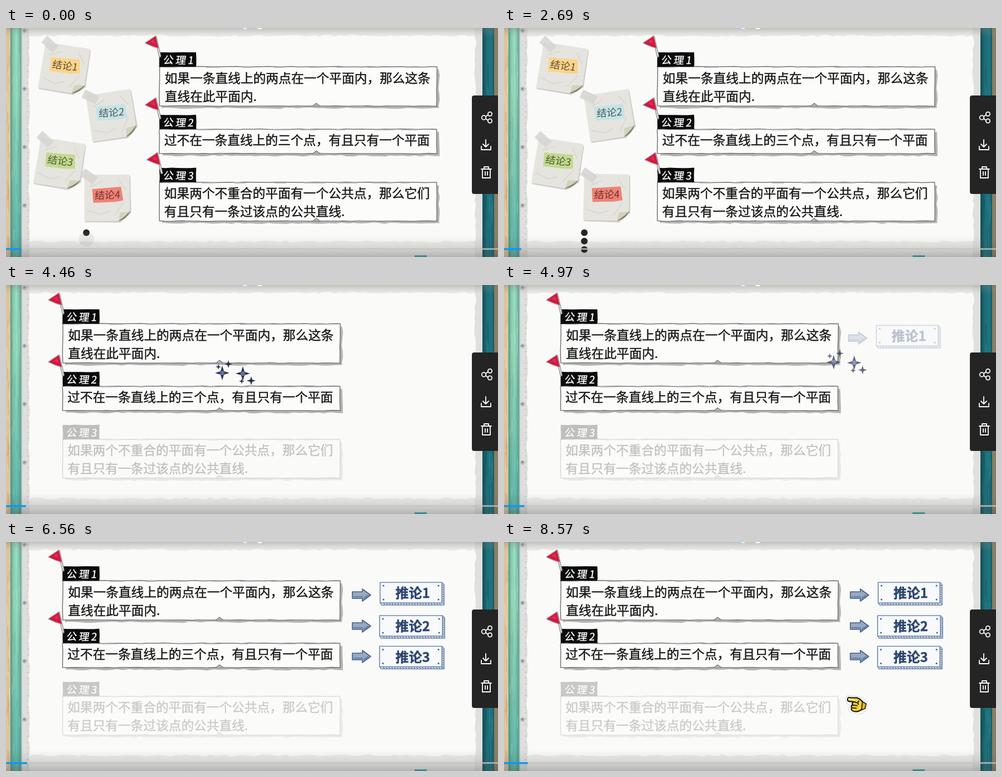
Write an HTML page that moves like this. It is 885x414 px and loops after 8670 ms.

```html
<!DOCTYPE html>
<html lang="zh">
<head>
<meta charset="utf-8">
<title>公理与推论</title>
<style>
html,body{margin:0;width:100%;height:100%;overflow:hidden;background:#fafaf9}
svg{display:block;width:100vw;height:100vh}
text{font-family:"Noto Sans CJK SC","Noto Sans CJK",sans-serif}
.body{font-size:22.75px;fill:#161616;stroke:#161616;stroke-width:.4}
.label{font-size:18.5px;fill:#fff;stroke:#fff;stroke-width:.4}
.memo{font-size:18px;fill:#4b443c;text-anchor:middle}
.sign{font-size:24px;font-weight:700;fill:#2b4570;stroke:#2b4570;stroke-width:.4;text-anchor:middle}
</style>
</head>
<body>
<svg id="stage" viewBox="0 0 885 414" preserveAspectRatio="none">
<defs>
  <linearGradient id="bar">
    <stop offset="0" stop-color="#4b9483"/><stop offset=".2" stop-color="#7cc8a8"/>
    <stop offset=".55" stop-color="#9cdcbd"/><stop offset=".85" stop-color="#6fbca2"/><stop offset="1" stop-color="#4f918a"/>
  </linearGradient>
  <linearGradient id="age" x2="0" y2="1">
    <stop offset=".3" stop-color="#2f8d92" stop-opacity="0"/><stop offset="1" stop-color="#2f8d92" stop-opacity=".5"/>
  </linearGradient>
  <linearGradient id="teal">
    <stop offset="0" stop-color="#0f4d58"/><stop offset=".35" stop-color="#1d6c78"/>
    <stop offset=".75" stop-color="#20757f"/><stop offset="1" stop-color="#174f58"/>
  </linearGradient>
  <linearGradient id="topShade" x2="0" y2="1">
    <stop offset="0" stop-color="#77776c" stop-opacity=".36"/><stop offset="1" stop-color="#999" stop-opacity="0"/>
  </linearGradient>
  <linearGradient id="lowShade" x2="0" y2="1">
    <stop offset="0" stop-color="#555" stop-opacity="0"/><stop offset=".5" stop-color="#555" stop-opacity=".12"/>
    <stop offset="1" stop-color="#444" stop-opacity=".34"/>
  </linearGradient>
  <radialGradient id="flash">
    <stop offset="0" stop-color="#fff" stop-opacity=".6"/><stop offset=".62" stop-color="#dfe6f2" stop-opacity=".25"/>
    <stop offset=".8" stop-color="#51648a" stop-opacity=".55"/><stop offset="1" stop-color="#8797b5" stop-opacity="0"/>
  </radialGradient>
</defs>
<g id="back"></g>
<g id="notes"></g>
<g id="dots"></g>
<g id="panels"></g>
<g id="signs"></g>
<g id="sparks"></g>
<g id="hand">
  <path d="M-20-10Q-18-17-10-15L3-16Q14-13 20-7L19 9Q12 17 2 16L-10 14Q-14 8-10 3Q-19-1-20-10Z" fill="#fff" stroke="#d2d2d0"/>
  <path d="M-16-9Q-16-13-11-12L1-13Q8-11 12-6L12 6Q6 13-2 12Q-9 11-7 6Q-9 3-6 0Q-8-3-5-5L-13-5Q-16-5-16-9Z" fill="#f2d23c" stroke="#17150f" stroke-width="2.2"/>
  <path d="M-15-9L-3-9" stroke="#fff6c4" stroke-width="2"/>
  <path d="M-5-5L4-4M-6 1L3 1M-6 6L2 6M5-8Q1-4 5-1" fill="none" stroke="#17150f" stroke-width="1.8"/>
  <path d="M11-7L18-4L17 5L11 8Z" fill="#e5b92c" stroke="#17150f" stroke-width="1.6"/>
</g>
<g id="chrome"></g>
</svg>
<script>
const LOOP = 8670, INK = '#2b3350';
const $ = id => document.getElementById(id);
let seed = 7;
const rnd = () => (seed = seed * 16807 % 2147483647) / 2147483647;
const tag = (n, a, s = '') =>
  `<${n} ${Object.entries(a).map(([k, v]) => `${k}="${v}"`).join(' ')}>${s}</${n}>`;
const rect = (x, y, width, height, fill, more = {}) => tag('rect', {x, y, width, height, fill, ...more});
const path = (d, fill, more = {}) => tag('path', {d, fill, ...more});
const text = (s, x, y, c, more = {}) => tag('text', {x, y, class: c, ...more}, s);
const group = (s, transform, more = {}) => tag('g', {transform, ...more}, s);
const circle = (cx, cy, r, fill, more = {}) => tag('circle', {cx, cy, r, fill, ...more});

// Torn outline of a box
function torn(x, y, w, h, j, step) {
  const p = [], add = (a, b) => p.push((a + (rnd() - .5) * j).toFixed(1) + ' ' + (b + (rnd() - .5) * j).toFixed(1));
  for (let i = 0; i < w; i += step) add(x + i, y);
  for (let i = 0; i < h; i += step) add(x + w, y + i);
  for (let i = w; i > 0; i -= step) add(x + i, y + h);
  for (let i = h; i > 0; i -= step) add(x, y + i);
  return 'M' + p.join('L') + 'Z';
}

function drawBack() {
  let s = rect(0, 0, 885, 414, '#ecece9') + rect(0, 0, 9, 414, '#dfc49b');
  for (let i = 0; i < 24; i++) s += rect(rnd() * 7, rnd() * 414, 2, 8 + rnd() * 26, i % 2 ? '#cda878' : '#ecd9b5', {opacity: .5});
  s += rect(8, 0, 20, 414, 'url(#bar)') + rect(8, 0, 20, 414, 'url(#age)');
  for (let i = 0; i < 20; i++) s += rect(10 + rnd() * 15, rnd() * 414, 1.5, 10 + rnd() * 40, i % 2 ? '#c2edd6' : '#4a9c8f', {opacity: .3});
  s += rect(28, 0, 14, 414, '#dededd') + rect(27, 0, 2, 414, '#b4bcb9');
  for (let y = 4; y < 414; y += 10.5) s += rect(37, y, 4, 1, '#bdbdbc');
  for (let i = 0; i < 4; i++) s += circle(33.5, 5 + i * 105.3, 4, '#bdbdbd') + circle(33, 4.5 + i * 105.3, 2, '#8d8d8d');
  s += rect(843, 0, 15, 414, '#e0e0dd') + rect(857, 0, 22, 414, 'url(#teal)') + rect(878, 0, 7, 414, '#8b7d64');
  for (let i = 0; i < 22; i++) s += rect(859 + rnd() * 16, rnd() * 414, 1.5, 12 + rnd() * 40, i % 2 ? '#3c949b' : '#0b3f4a', {opacity: .35});
  s += path(torn(42, 14, 802, 372, 4, 9), '#fafaf9');
  s += rect(0, 0, 885, 16, 'url(#topShade)') + rect(0, 376, 885, 38, 'url(#lowShade)');
  s += rect(735, 411, 22, 3, '#3c8c8d') + rect(415, 0, 9, 1.5, '#8fd0ff') + rect(427, 0, 6, 1.5, '#fff') + rect(453, 0, 7, 2, '#fff');
  $('back').innerHTML = s;
}

function memo(n, x, y, a, ink, color, ta) {
  const s = path('M-38-41L41-41L42 26L22 43L-41 42Z', '#cfcdc9', {transform: 'translate(1.5 2)'}) +
    path('M-40-42L41-42L41 25L21 42L-41 42Z', '#e6e4df') +
    path('M-30-20L-8-30M-36 22L-12 30L4 24M14 32L30 8M22-32L34-14', 'none', {stroke: '#dbd8d2', 'stroke-width': 2}) +
    path('M21 42L23 27L41 25Z', '#d3d2bc') + path('M21 42Q35 38 41 25Q35 33 21 42Z', '#76795a', {stroke: '#85886b'}) +
    group(rect(-14, -8, 28, 16, '#d6d5d3', {opacity: .85}), 'translate(-32 -39) rotate(34)') +
    group(path('M-27-12L25-14L28 11L12 13L-26 13Z', color) + text(n, 0, 6.5, 'memo', {style: 'fill:' + ink, transform: 'skewX(-5)'}), `translate(1 -5) rotate(${ta})`);
  return group(group(s, `rotate(${a})`), `translate(${x} ${y})`);
}

function drawNotes() {
  $('notes').innerHTML = memo('结论1', 104.5, 73, 9, '#5d4a2c', '#fad48c', -2) +
    memo('结论2', 189.5, 158, -9, '#4c5757', '#c5e3e4', 5) +
    memo('结论3', 96, 245, 9, '#4a5a2c', '#c3d990', -2) +
    group(memo('结论4', 184, 306, 1, '#6e302a', '#ee8376', -2), '', {id: 'last'});
  $('dots').innerHTML = [0, 1, 2].map(() => circle(144.5, 0, 6, '#262626')).join('');
}

const flag = (x, y) => group(
  path('M0 1L8 36', 'none', {stroke: '#8d8d8d', 'stroke-width': 4.4, 'stroke-linecap': 'round'}) +
  path('M0 1L8 36', 'none', {stroke: '#e4e4e2', 'stroke-width': 2}) +
  path('M0 0L-18 12Q-6 18 5 21Z', '#c9c5c6', {stroke: '#b3a9ab', 'stroke-width': 2.6, 'stroke-linejoin': 'round'}) +
  path('M0 0L-18 12Q-6 18 5 21Z', '#d3173f') + path('M-3 5L-10 10L0 14Z', '#e63a5a', {opacity: .6}),
  `translate(${x} ${y})`, {class: 'flag'});

function panel(n, y, h, fx, fy, lines, tx) {
  let s = path(torn(281, y + 5, 498, h - 1, 2.6, 11), '#b4b4b2');
  s += path(torn(276, y, 499, h, 1, 14), '#fcfcfb', {stroke: '#767674', 'stroke-width': 1.5});
  for (let i = 0; i < 7; i++) {
    const x = 345 + i * 60 + rnd() * 20, w = 12 + rnd() * 26;
    s += rect(x, y, w, 1.8, '#aaa') + rect(x - 30, y + h - 1, w, 2, '#999');
  }
  s += path(`M552 ${y + h}L558 ${y + h - 5}L565 ${y + h}`, '#b5b5b3', {stroke: '#777', 'stroke-width': 1.2});
  s += path(torn(276, y - 26, 66, 26, 1, 11), '#0b0b0b');
  s += group(text('公', 0, 0, 'label', {transform: 'rotate(-3)'}) + text('理', 22, -.5, 'label') + text(n, 44, -.5, 'label'), `translate(282.5 ${y - 5}) skewX(-8)`);
  lines.forEach((l, i) => s += text(l, tx, y + (h < 71 ? 28 : 29) + i * 32.5, 'body'));
  return tag('g', {class: 'panel'}, s + flag(fx, fy));
}

function drawPanels() {
  $('panels').innerHTML =
    panel(1, 70, 71, 269, 15, ['如果一条直线上的两点在一个平面内，那么这条', '直线在此平面内.'], 285.5) +
    panel(2, 183, 44, 269, 127, ['过不在一条直线上的三个点，有且只有一个平面'], 284.5) +
    panel(3, 279, 70, 272, 226, ['如果两个不重合的平面有一个公共点，那么它们', '有且只有一条过该点的公共直线.'], 284.5);
}

const star = (x, y, r, fill = INK) => {
  const k = r * .24;
  return path(`M0 ${-r}L${k} ${-k}L${r} 0L${k} ${k}L0 ${r}L${-k} ${k}L${-r} 0L${-k} ${-k}Z`, fill, {transform: `translate(${x} ${y})`});
};

function sign(n, x, y, w, ay) {
  const h = 37, line = {stroke: '#7089ad', 'stroke-width': 1.6, 'stroke-linejoin': 'round'};
  let s = path(`M623 ${ay - 6}H641V${ay - 11}L656 ${ay}L641 ${ay + 11}V${ay + 6}H623Z`, '#97a9c4', {...line, stroke: '#465d83'});
  s += path(`M625 ${ay + 3}H642M643 ${ay + 6}L652 ${ay}`, 'none', {stroke: '#647ea6', 'stroke-width': 2.2});
  s += path(`M${x} ${y + h}L${x + 3} ${y + h + 4}H${x + w + 4}V${y + 4}L${x + w} ${y}`, '#dbe4f0', line);
  let d = '';
  for (let i = 6; i < w; i += 5) d += `M${x + i} ${y + h}l3 4`;
  for (let i = 4; i < h; i += 4) d += `M${x + w} ${y + i}l4 3`;
  s += path(d, 'none', {stroke: '#6c86ab', 'stroke-width': 1.5});
  s += rect(x, y, w, h, '#f8f9fa', line);
  for (const a of [6, w - 6]) for (const b of [6, h - 6]) s += circle(x + a, y + b, 1.5, '#3d5a87');
  return tag('g', {class: 'tip'}, s + text('推论' + n, 731.5, y + 28, 'sign'));
}

function drawSigns() {
  const ys = [73, 133, 188.5];
  $('signs').innerHTML = sign(1, 673, ys[0], 111, 96) + sign(2, 672, ys[1], 113, 152) + sign(3, 672, ys[2], 112, 207) +
    ys.map(y => group(circle(0, 0, 25, 'url(#flash)') +
      circle(0, 0, 19, 'none', {stroke: INK, 'stroke-width': 2.6, opacity: .75}) +
      [0, 90, 180, 270].map(a => path('M-2.5-19L0-30L2.5-19Z', INK, {transform: `rotate(${a})`})).join(''),
      `translate(699 ${y + 21})`, {class: 'ring'})).join('');
  $('sparks').innerHTML = star(389, 159, 13) + star(426, 160, 13) + star(400, 143, 7) +
    star(382, 148, 5) + star(424, 174, 5) + star(441, 173, 8) +
    circle(389, 159, 4, '#60709a') + circle(426, 160, 4, '#60709a');
}

function drawChrome() {
  const line = {stroke: '#fff', 'stroke-width': 1.8, 'stroke-linecap': 'round', 'stroke-linejoin': 'round'};
  $('chrome').innerHTML = rect(0, 398, 885, 3, '#c3c3c1', {opacity: .75}) + rect(0, 398, 28, 3.5, '#0a9bf5', {id: 'seek'}) +
    rect(838, 122, 52, 178, '#242424', {rx: 4}) +
    path('M863 160L867 157M863 164L867 167', 'none', line) +
    circle(859.5, 162, 3.8, 'none', line) + circle(870.5, 155.5, 3.6, 'none', line) + circle(870.5, 168, 3.6, 'none', line) +
    path('M863 202V215M858 210L863 215L868 210M855 214V220H872V214', 'none', line) +
    path('M855 255H873M860 255V251H868V255M857 255V271H871V255M862 260V266M866 260V266', 'none', line);
}

// Piecewise linear track: t0, v0, t1, v1, ...
function track(t, ...k) {
  if (t <= k[0]) return k[1];
  for (let i = 2; i < k.length; i += 2)
    if (t < k[i]) return k[i - 1] + (k[i + 1] - k[i - 1]) * (t - k[i - 2]) / (k[i] - k[i - 2]);
  return k[k.length - 1];
}
const set = (e, a) => { for (const k in a) e.setAttribute(k, a[k]); };

const ticks = [0, 150, 270, 420, 540, 680, 830, 980, 1140, 1260, 1380, 2170, 2690, 2840, 2990, 3110, 3260, 3380, 3530, 3650, 3800, 4460, 4580];
const run = (from, to, n) => { for (let i = 0; i < n; i++) ticks.push(from + (to - from) * i / (n - 1)); };
run(4730, 5330, 6); run(5480, 5600, 2); run(5750, 5870, 2); run(6020, 6410, 4);
run(6560, 7160, 6); run(7310, 7670, 4); run(7820, 8300, 5); run(8450, 8570, 2);

drawBack(); drawNotes(); drawPanels(); drawSigns(); drawChrome();
const all = q => [...document.querySelectorAll(q)];
const dots = all('#dots circle'), panels = all('.panel'), tips = all('.tip'), rings = all('.ring'), flags = all('.flag');

function render(now) {
  let t = 0;
  for (const k of ticks) if (k <= now) t = k;

  const gone = track(t, 2690, 0, 2990, 1);
  set($('notes'), {opacity: 1 - gone, transform: `translate(${-50 * gone} 0)`});
  const swing = track(t, 150, 1, 1380, 0);
  set($('last'), {transform: `translate(${-2.5 * swing} ${swing}) rotate(${-1.5 * swing} 184 306)`});
  set($('dots'), {opacity: 1 - gone});
  dots.forEach((d, i) => {
    const p = i ? track(t, i * 480 - 560, 0, i * 480 - 60, 1) : 1;
    const on = i < 2 || t >= 420;
    set(d, {cy: 370 + i * 15.3 - (1 - p) * 4, r: 6 + 9 * (1 - p), opacity: on ? .1 + .9 * p * p : 0, fill: p < .35 ? '#777' : '#262626'});
  });

  set($('panels'), {transform: `translate(${track(t, 2690, 0, 2840, -85, 2990, -176, 3110, -174)} 0)`});
  set(panels[2], {opacity: track(t, 2690, 1, 2990, .47, 3380, .3, 3800, .26, 5600, .24, 6560, .21)});
  set(flags[2], {opacity: track(t, 2690, 1, 2990, 0)});

  set($('sparks'), {
    opacity: t < 4460 ? 0 : track(t, 4460, 1, 4850, .9, 5480, 0),
    transform: `translate(${track(t, 4460, 0, 5090, 252)} ${track(t, 4460, 0, 5090, -24)})`
  });
  const starts = [4850, 5090, 5320];
  tips.forEach((g, i) => {
    const p = track(t, starts[i], 0, starts[i] + 400, 1);
    set(g, {opacity: p, transform: `translate(${-5 * (1 - p) + (i < 2 ? track(t, 5600, 1, 6020, 0) * p : 0)} 0)`});
  });
  rings.forEach((g, i) => {
    const k = 5300 + i * 300;
    set(g, {opacity: track(t, k - 250, 0, k, 1, k + 400, 0)});
  });

  const sway = t < 7670 ? 0 : 4 * Math.sin((t - 8570) / 450 * Math.PI * 2);
  set($('hand'), {
    opacity: track(t, 7160, 0, 7550, 1),
    transform: `translate(${633 + track(t, 7160, 26, 7670, 0) + sway} 294.5) rotate(6)`
  });
  set($('seek'), {width: track(t, 0, 28, 2170, 31, 2690, 31, 2990, 33, 4460, 36, 5600, 38, 6560, 38, 8570, 43)});
}

const start = performance.now();
function loop() {
  render((performance.now() - start) % LOOP);
  requestAnimationFrame(loop);
}
loop();
</script>
</body>
</html>
```
